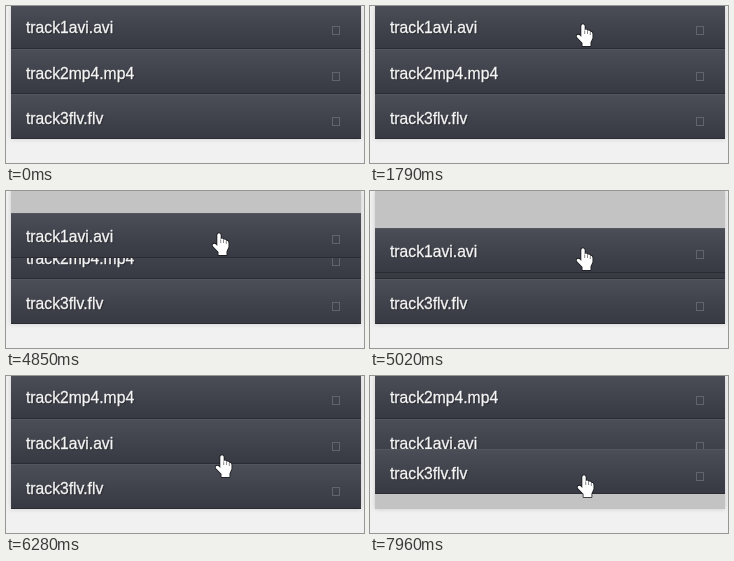
Recreate the animation shown at these times as an HTML page. Size 358x157 px, loop 8000 ms.

```html
<!DOCTYPE html>
<html lang="en">
<head>
<meta charset="utf-8">
<title>Sortable playlist</title>
<style>
  html, body { margin: 0; width: 100%; height: 100%; overflow: hidden; background: #f1f1f1; }
  .list {
    position: absolute; left: 5px; top: 0; width: 350px; height: 133px;
    background: #c3c3c3; box-shadow: 0 0 5px rgba(0, 0, 0, .16);
  }
  .row {
    position: absolute; width: 350px; height: 45px; box-sizing: border-box; padding-top: .6px;
    border-top: 1px solid #54565f; border-bottom: 1px solid #2a2c32;
    background: linear-gradient(#4b4d57, #373a42);
    color: #f4f4f4; font: 15.7px/46px "Liberation Sans", Arial, sans-serif;
    -webkit-text-stroke: .3px #f4f4f4;
    text-indent: 15px; text-shadow: 1px 1px 1px #25272c; white-space: nowrap;
  }
  .row::after {
    content: ""; position: absolute; left: 321px; top: 21.6px; width: 6px; height: 7px;
    border: 1px solid #62646d;
  }
  #hand { position: absolute; left: 0; top: 0; z-index: 2; overflow: visible; }
</style>
</head>
<body>
<div class="list">
  <div class="row">track1avi.avi</div>
  <div class="row">track2mp4.mp4</div>
  <div class="row">track3flv.flv</div>
</div>
<svg id="hand" width="17" height="23" fill="#fff" stroke="#17181b" stroke-linejoin="round">
  <path paint-order="stroke" stroke-width="1.6" d="M5.3 2A1.7 1.7 0 0 1 8.7 2V6.2Q9.2 5.5 10 5.6Q11.2 5.7 11.5 6.8Q12 6.3 13 6.5Q14 6.7 14.3 7.8Q16.5 7.6 16.5 9.8V14L14.5 18.5V22H6.5V19L1.2 13.5Q0 12 1 11.2Q2.4 10 4 11.6L5.3 13Z"/>
  <path d="M8.7 6.5V10M11.5 7V10M14.3 8V11" stroke-width=".5"/>
</svg>
<script>
  const LOOP = 8000;
  const SWAP = 5090, DROP = 6280;
  const rows = [...document.querySelectorAll('.row')];
  const hand = document.getElementById('hand');

  const slot = i => -2.4 + 45.4 * i;
  const ease = p => p * p * (3 - 2 * p);
  const mix = (a, b, p) => Math.round(a + (b - a) * p);

  // Pointer strokes; a higher bend delays the sideways part.
  const start = { x: 234, y: 112 };
  const strokes = [
    { from: 610, to: 840, steps: 4, x: 213, y: 86 },
    { from: 1080, to: 1560, steps: 7, x: 206, y: 19 },
    { from: 1790, to: 1790, steps: 1, x: 206, y: 18 },
    { from: 4520, to: 5320, steps: 11, x: 208, y: 74, bend: 4 },
    { from: 5380, to: 5470, steps: 2, x: 209, y: 79 },
    { from: 7090, to: 7330, steps: 4, x: 207, y: 114 },
    { from: 7810, to: 7960, steps: 3, x: 207, y: 99 }
  ];

  const drags = [
    { row: 0, from: 4520, to: DROP },
    { row: 2, from: 7810, to: LOOP }
  ];

  function pointerAt(t) {
    let at = start;
    for (const { from, to, steps, x, y, bend = 1 } of strokes) {
      if (t < from) break;
      const interval = (to - from) / (steps - 1) || 1;
      const step = Math.min(steps, Math.floor((t - from) / interval + 1.3));
      const p = ease(step / steps);
      at = { x: mix(at.x, x, p ** bend), y: mix(at.y, y, p) };
    }
    return at;
  }

  function restingTop(i, t) {
    if (i === 0) return slot(t < DROP ? 0 : 1);
    if (i === 1 && t >= SWAP) return t < DROP ? Math.round(slot(0)) : slot(0);
    return slot(i);
  }

  function draw(t) {
    const at = pointerAt(t);
    hand.style.display = t < strokes[0].from ? 'none' : '';
    hand.style.transform = `translate(${at.x}px, ${at.y}px)`;

    rows.forEach((row, i) => {
      const drag = drags.find(d => d.row === i && t >= d.from && t < d.to);
      const grab = drag ? pointerAt(drag.from - 1) : at;
      row.style.zIndex = drag ? 1 : 0;
      row.style.left = `${at.x - grab.x}px`;
      row.style.top = `${restingTop(i, t) + at.y - grab.y}px`;
    });
  }

  const began = performance.now();
  function frame() {
    draw((performance.now() - began) % LOOP);
    requestAnimationFrame(frame);
  }
  frame();
</script>
</body>
</html>
```
